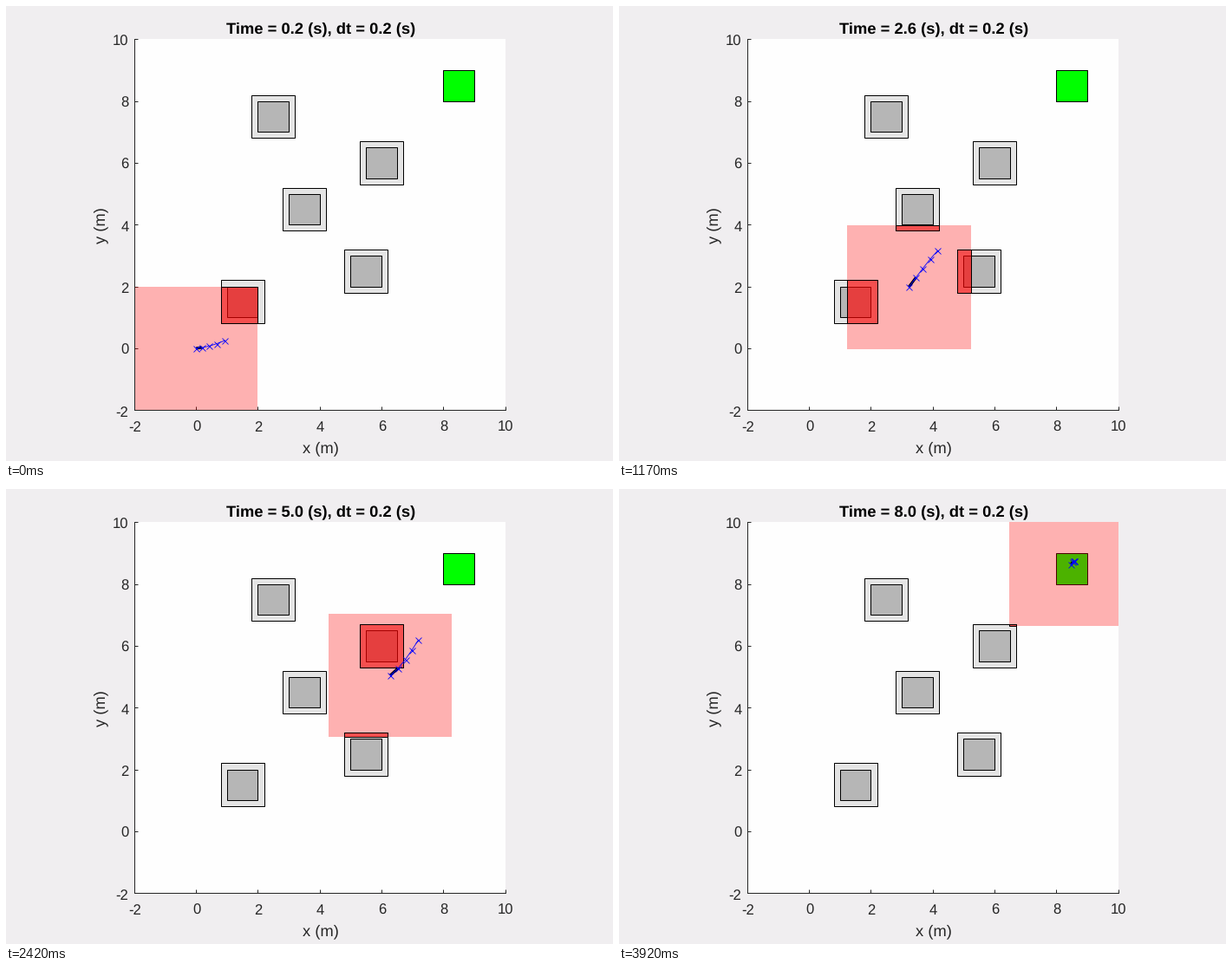
Recreate the animation shown at these times as a matplotlib script. Size 700 px wide and 525 px high, loop 4.01 s.

```python
import numpy as np
import matplotlib.pyplot as plt
from matplotlib.animation import FuncAnimation
from matplotlib.patches import Rectangle

W, H, DPI = 700, 525, 100
PX = 72 / DPI            # one pixel in points
TICK_MS, LOOP_MS = 10, 4010
DT, STEPS = 0.2, 40
SIGHT, HORIZON = 2.0, 4  # half width of the sensor box, steps planned ahead
MARGIN = 0.2

OBSTACLES = [(1, 1), (3, 4), (2, 7), (5, 2), (5.5, 5.5)]
GOAL = (8, 8)

# a few waypoints and the step at which each is reached
REACHED = np.array([0, 4, 8, 16, 21, 25, 28, 33, 39, 43])
WAYPOINTS = np.array([(0, 0), (.93, .25), (2.21, .93), (4.16, 3.16),
                      (5.44, 4.46), (6.54, 5.28), (7.19, 6.19),
                      (7.97, 7.82), (8.48, 8.65), (8.57, 8.74)])


def hermite(t, knots, points):
    """Smooth curve through the points at the times in knots."""
    slope = np.gradient(points, knots, axis=0, edge_order=2)
    i = np.clip(np.searchsorted(knots, t, side="right") - 1, 0, len(knots) - 2)
    h = (knots[i + 1] - knots[i])[:, None]
    u = (t - knots[i])[:, None] / h
    return ((1 + 2 * u) * (1 - u) ** 2 * points[i]
            + u * (1 - u) ** 2 * h * slope[i]
            + u * u * (3 - 2 * u) * points[i + 1]
            + u * u * (u - 1) * h * slope[i + 1])


path = hermite(np.arange(STEPS + HORIZON), REACHED, WAYPOINTS)

plt.rcParams.update({"font.family": "Liberation Sans", "text.hinting": "none"})
INK = "#262626"
fig = plt.figure(figsize=(W / DPI, H / DPI), dpi=DPI, facecolor="#f0eef0")
ax = fig.add_axes([.13 - .5 / W, .11 + 1 / H, .775, .815], facecolor="#fefefe")
ax.set(xlim=(-2, 10), ylim=(-2, 10), aspect="equal", axisbelow=True)
grid = range(-2, 11, 2)
ax.set_xticks(grid, [""] * len(grid))
ax.set_yticks(grid, [""] * len(grid))
ax.tick_params(direction="in", length=4.3 * PX, width=PX, color=INK)
for side, spine in ax.spines.items():
    spine.set(visible=side in ("left", "bottom"), linewidth=PX, color=INK)


def label(x, y, text, px, color=INK, ha="center", **kw):
    """Text with its baseline at pixel (x, y), counted from the top left."""
    return fig.text(x / W, 1 - y / H, text, fontsize=px * PX, color=color,
                    ha=ha, va="baseline", **kw)


UNIT = 35.656
for v in grid:
    label(148.3 + UNIT * (v + 2), 491, str(v), 16.67)
    label(141.5, 473.5 - UNIT * (v + 2), str(v), 16.67, ha="right")
label(362.7, 515, "x (m)", 18.33)
label(114, 252.8, "y (m)", 18.33, rotation=90, rotation_mode="anchor")
title = label(363, 31, "", 18.33, color="black", weight="bold")


def box(x, y, size, face, edge="black"):
    return ax.add_patch(Rectangle((x, y), size, size, facecolor=face,
                                  edgecolor=edge, linewidth=PX))


for x, y in OBSTACLES:
    box(x - MARGIN, y - MARGIN, 1 + 2 * MARGIN, (0, 0, 0, .1))
    box(x, y, 1, (0, 0, 0, .2))
box(*GOAL, 1, (0, 1, 0))
sensor = box(0, 0, 2 * SIGHT, (1, 0, 0, .3), "none")
seen = [box(0, 0, 1, (1, 0, 0, .5)) for _ in OBSTACLES]
heading, = ax.plot([], [], color="black", lw=3 * PX, solid_capstyle="butt")
plan, = ax.plot([], [], color="blue", lw=.83 * PX, marker="x", ms=7 * PX,
                mew=.83 * PX)


def step_at(tick):
    """Twelve slots a second; every sixth one holds the step before it."""
    slot = min((2 * tick + 1) * 3 // 50, 47)
    return slot - (slot + 3) // 6


def draw(tick):
    n = step_at(tick)
    title.set_text(f"Time = {DT * (n + 1):.1f} (s), dt = {DT} (s)")
    pos = path[n]
    sensor.set_xy(pos - SIGHT)
    for patch, corner in zip(seen, OBSTACLES):
        lo = np.maximum(np.subtract(corner, MARGIN), pos - SIGHT)
        hi = np.minimum(np.add(corner, 1 + MARGIN), pos + SIGHT)
        patch.set_visible(bool((hi > lo).all()))
        patch.set_bounds(*lo, *(hi - lo))
    plan.set_data(*path[n:n + HORIZON + 1].T)
    heading.set_data(*path[n:n + 2].T)
    return [title, sensor, plan, heading, *seen]


anim = FuncAnimation(fig, draw, frames=LOOP_MS // TICK_MS, interval=TICK_MS,
                     init_func=lambda: draw(0), repeat=True, repeat_delay=0)
plt.show()
```
